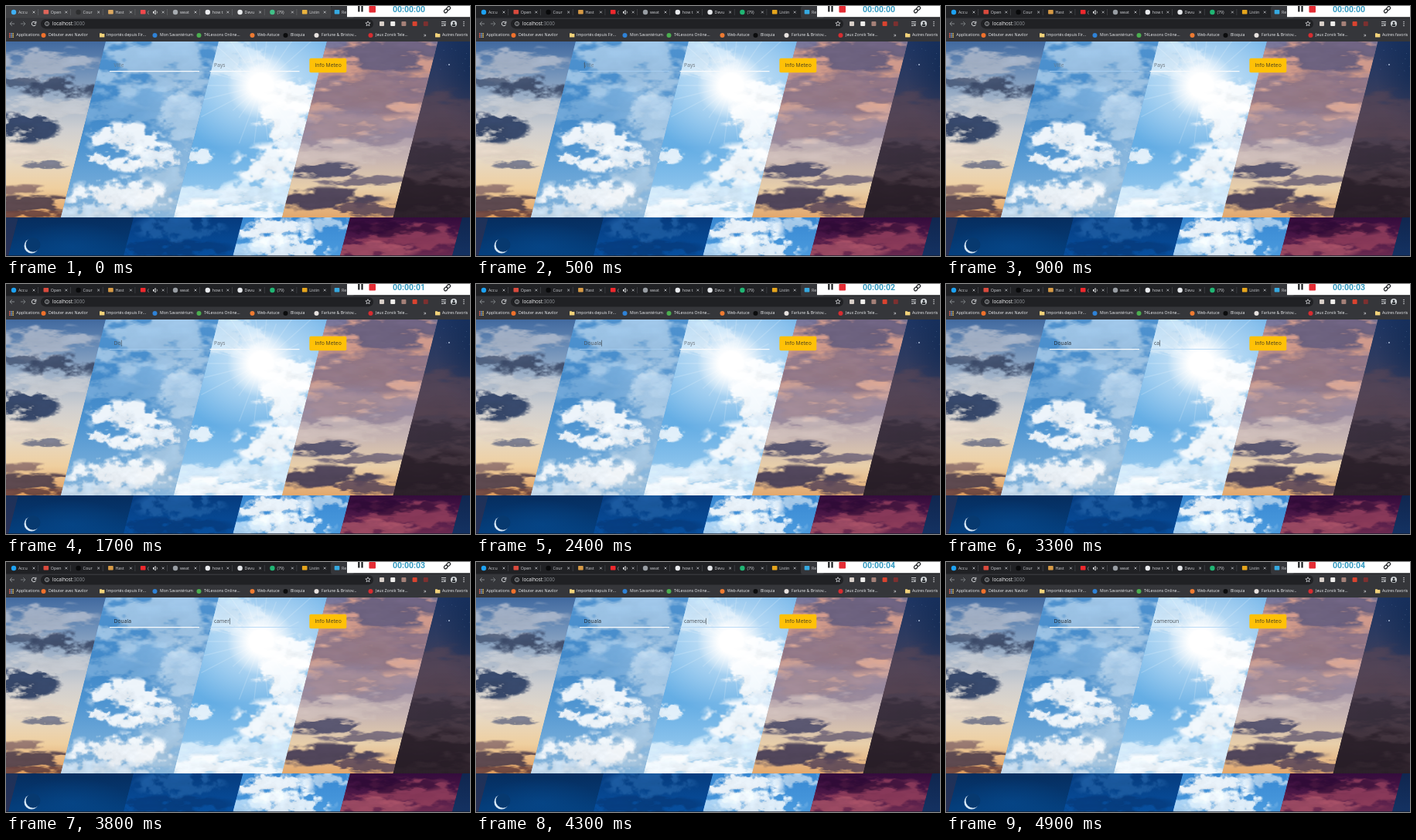
Recreate the animation shown at these times as an HTML page with a canvas. Size 600 by 324 pixels, loop 5000 ms.

```html
<!DOCTYPE html>
<html lang="fr">
<head>
<meta charset="utf-8">
<title>Info Meteo</title>
<style>
html, body { margin: 0; width: 100%; height: 100%; overflow: hidden; background: #202124; }
canvas { display: block; width: 600px; height: 324px; }
</style>
</head>
<body>
<canvas id="stage"></canvas>
<script>
const start = performance.now();
const W = 600, H = 324, LOOP = 5000;
const ratio = Math.max(1, window.devicePixelRatio || 1);
const UI = '"Open Sans", "Noto Sans", sans-serif';

function prepare(canvas) {
  canvas.width = W * ratio;
  canvas.height = H * ratio;
  const c = canvas.getContext('2d');
  c.scale(ratio, ratio);
  return c;
}
const screen = prepare(document.getElementById('stage'));
const backdrop = document.createElement('canvas');
let g = prepare(backdrop);

const clamp = (v, low = 0, high = 1) => Math.min(high, Math.max(low, v));

function rect(x, y, w, h, fill, r = 0) {
  g.fillStyle = fill;
  g.beginPath();
  g.roundRect(x, y, w, h, r);
  g.fill();
}
function disc(x, y, r, fill) {
  g.fillStyle = fill;
  g.beginPath();
  g.arc(x, y, r, 0, 7);
  g.fill();
}
function path(points, stroke, width = 1) {
  g.strokeStyle = stroke;
  g.lineWidth = width;
  g.beginPath();
  points.forEach(([x, y]) => g.lineTo(x, y));
  g.stroke();
}
function ring(x, y, r, stroke, width = 1, from = 0, to = 7) {
  g.strokeStyle = stroke;
  g.lineWidth = width;
  g.beginPath();
  g.arc(x, y, r, from, to);
  g.stroke();
}
function text(s, x, y, size, fill, font = UI, weight = 400) {
  g.font = `${weight} ${size}px ${font}`;
  g.textBaseline = 'middle';
  g.fillStyle = fill;
  g.fillText(s, x, y);
  return g.measureText(s).width;
}

// ---- sky -------------------------------------------------------------

function hash(i, j) {
  let n = Math.imul(i, 374761393) + Math.imul(j, 668265263);
  n = Math.imul(n ^ (n >>> 13), 1274126177);
  return ((n ^ (n >>> 16)) >>> 0) / 4294967296;
}
function noise(x, y) {
  const i = Math.floor(x), j = Math.floor(y);
  const u = (x - i) ** 2 * (3 - 2 * (x - i)), v = (y - j) ** 2 * (3 - 2 * (y - j));
  const top = hash(i, j) * (1 - u) + hash(i + 1, j) * u;
  const low = hash(i, j + 1) * (1 - u) + hash(i + 1, j + 1) * u;
  return top * (1 - v) + low * v;
}
const fractal = (x, y) =>
  (noise(x, y) * 8 + noise(x * 2, y * 2) * 4 + noise(x * 4, y * 4) * 2 + noise(x * 8, y * 8)) / 15;

// An ellipse of vapour whose edge and shading come from fractal noise.
function cloud(x, y, w, h, rgb, alpha = .9, stretch = 1.4) {
  const tw = Math.ceil(w * 1.3), th = Math.ceil(h * 1.4), scale = 5 + h * .12;
  const tile = new OffscreenCanvas(tw, th), c = tile.getContext('2d');
  const image = c.createImageData(tw, th);
  for (let k = 0; k < tw * th; k++) {
    const px = k % tw, py = Math.floor(k / tw);
    const body = 1 - Math.hypot(px / tw * 2 - 1, py / th * 2 - 1);
    if (body <= 0) continue;
    const f = fractal((x + px) / scale / stretch, (y + py) / scale);
    const density = clamp((body * 1.3 + (f - .5) * 2.6 - .12) / .5);
    const shade = .88 + .16 * f + .06 * (1 - py / th);
    rgb.forEach((v, n) => image.data[k * 4 + n] = clamp(v * shade, 0, 255));
    image.data[k * 4 + 3] = 255 * alpha * density * clamp(body * 4);
  }
  c.putImageData(image, 0, 0);
  g.drawImage(tile, x - tw / 2, y - th / 2);
}
function glow(x, y, rx, ry, rgb, alpha, core = 0) {
  g.save();
  g.translate(x, y);
  g.scale(rx, ry);
  const soft = g.createRadialGradient(0, 0, 0, 0, 0, 1);
  soft.addColorStop(core, `rgba(${rgb},${alpha})`);
  soft.addColorStop(1, `rgba(${rgb},0)`);
  g.fillStyle = soft;
  g.fillRect(-1, -1, 2, 2);
  g.restore();
}
function panel(top, bottom, x0, x1, slant, colors, details) {
  g.save();
  g.beginPath();
  [[x0, top], [x1, top], [x1 - slant, bottom], [x0 - slant, bottom]].forEach(p => g.lineTo(...p));
  g.clip();
  const sky = g.createLinearGradient(0, top, 0, bottom);
  colors.forEach((c, i) => sky.addColorStop(i / (colors.length - 1), c));
  g.fillStyle = sky;
  g.fillRect(0, top, W, bottom - top);
  details();
  g.restore();
}
const upper = (x0, x1, colors, details) => panel(46, 274, x0, x1, 58, colors, details);
const lower = (x0, x1, colors, details) => panel(274, 324, x0, x1, 13, colors, details);
const WHITE = [252, 253, 254], SLATE = [58, 72, 102], PLUM = [72, 62, 86];

function drawSky() {
  upper(-90, 129, ['#41699f', '#6d8fb8', '#a3b4c9', '#cfcfd0', '#e6d9c6', '#efcf9f', '#dd9a5c'], () => {
    cloud(45, 75, 130, 40, [192, 196, 207], .7, 2.5);
    cloud(60, 130, 130, 30, [212, 212, 214], .6, 2.5);
    cloud(70, 105, 95, 26, SLATE, .9, 2.2);
    cloud(15, 98, 60, 14, SLATE, .7, 2.2);
    cloud(22, 157, 84, 34, [46, 64, 100], .95, 1.9);
    cloud(40, 190, 110, 24, [226, 210, 196], .6, 3);
    cloud(52, 205, 60, 10, [98, 104, 130], .8, 2.6);
    cloud(20, 238, 80, 12, [128, 98, 100], .8, 3);
    cloud(32, 256, 130, 20, [84, 66, 76], .95, 3);
    cloud(40, 270, 110, 10, [104, 66, 62], .9, 3);
  });

  upper(129, 275, ['#4f92cf', '#4a8fcd', '#3f87c8', '#4f95d1', '#6ea8d8', '#86b4da'], () => {
    glow(232, 190, 60, 130, '188,212,232', .5);
    cloud(200, 80, 170, 80, [206, 225, 241], .6, 1.8);
    cloud(170, 130, 150, 50, [170, 205, 234], .45, 1.8);
    cloud(230, 140, 60, 70, [214, 230, 243], .55);
    cloud(154, 172, 88, 38, WHITE);
    cloud(198, 194, 72, 30, [240, 245, 250]);
    cloud(118, 197, 32, 14, WHITE);
    cloud(160, 205, 60, 16, WHITE);
    cloud(205, 240, 70, 70, [184, 207, 226], .6);
    cloud(147, 248, 126, 46, [248, 249, 250]);
    cloud(125, 270, 150, 22, [206, 222, 236], .85);
  });

  upper(275, 415, ['#74b5e9', '#82bfed', '#6fb4e8', '#64ade4', '#86c0eb', '#b4d8f1'], () => {
    cloud(285, 66, 100, 44, [214, 234, 248], .6);
    glow(330, 103, 115, 95, '255,255,255', .7);
    for (let i = 0; i < 26; i++) {
      const a = i * Math.PI / 13, r = 45 + 50 * hash(i, 3);
      path([[330, 103], [330 + r * Math.cos(a), 103 + r * Math.sin(a)]], 'rgba(255,255,255,.17)', 1.4);
    }
    glow(330, 103, 44, 44, '255,255,255', 1, .35);
    cloud(368, 118, 70, 40, WHITE);
    cloud(362, 150, 78, 50, WHITE);
    cloud(376, 180, 60, 40, [232, 241, 249]);
    cloud(342, 206, 90, 46, WHITE);
    cloud(246, 194, 40, 18, WHITE, .8);
    cloud(330, 243, 110, 34, [222, 237, 248], .8);
    cloud(255, 247, 130, 24, [226, 239, 249], .75, 2);
    cloud(275, 267, 190, 30, [245, 249, 252], .9, 1.8);
  });

  upper(415, 558.5, ['#77759a', '#9c8597', '#b39095', '#aa9aab', '#c6b4b2', '#e8cfaa', '#e2a76c'], () => {
    cloud(470, 85, 210, 100, [220, 158, 136], .8, 3);
    cloud(440, 130, 180, 80, [224, 172, 152], .7, 3);
    cloud(500, 62, 150, 38, [92, 88, 124], .85, 2.6);
    cloud(480, 112, 180, 50, [112, 98, 128], .65, 3);
    cloud(440, 160, 190, 44, [138, 124, 148], .65, 3);
    cloud(440, 190, 160, 30, [214, 198, 192], .6, 3);
    cloud(405, 212, 100, 18, [82, 80, 108], .95, 2.8);
    cloud(460, 226, 110, 14, [100, 90, 114], .8, 3);
    cloud(410, 250, 140, 26, PLUM, .95, 2.6);
    cloud(470, 262, 100, 18, [92, 72, 88], .9, 2.8);
  });

  upper(558.5, 700, ['#1d3563', '#2c3a60', '#44405a', '#4c3e4c', '#41333d', '#2b2029'], () => {
    glow(604, 80, 48, 90, '14,40,82', .75);
    cloud(560, 150, 120, 70, [94, 70, 80], .5, 3);
    cloud(565, 195, 140, 40, [50, 42, 56], .7, 3);
    cloud(545, 245, 140, 50, [38, 28, 38], .75, 3);
    disc(573, 76, .9, '#b8c8e2');
    for (let i = 0; i < 12; i++) disc(558 + hash(i, 1) * 42, 50 + hash(i, 2) * 45, .35, '#6d84ab');
  });

  lower(-30, 16, ['#1c3159', '#2a3156'], () => {});
  lower(16, 165, ['#062d5e', '#04407f'], () => {
    glow(85, 312, 75, 32, '6,74,142', .6);
    disc(33, 311, 9.5, '#d6e7f6');
    disc(35, 309.4, 9.4, '#07396f');
  });
  lower(165, 306.5, ['#063b7d', '#0750a0'], () => {
    cloud(225, 288, 100, 32, [40, 104, 172], .6);
    cloud(215, 314, 140, 20, [6, 52, 112], .6, 2);
  });
  lower(306.5, 445, ['#3888d2', '#4b9bde'], () => {
    cloud(345, 287, 92, 40, WHITE);
    cloud(410, 281, 70, 18, [214, 232, 247], .7);
    cloud(365, 313, 100, 30, [238, 246, 252], .9);
    cloud(308, 318, 44, 18, [205, 228, 246], .7);
  });
  lower(445, 590, ['#340c3c', '#4a1746', '#6b2a50'], () => {
    cloud(520, 300, 140, 34, [160, 70, 96], .7, 2.4);
    cloud(470, 315, 110, 20, [176, 88, 106], .7, 2.4);
    cloud(490, 288, 130, 18, [44, 10, 52], .75, 2.6);
  });
  lower(590, 640, ['#10264f', '#143262'], () => {});
  rect(0, 323, W, 1, 'rgba(22,28,42,.65)');
}

// ---- browser window --------------------------------------------------

const TABS = [
  ['Accu', '#1da1f2'], ['Open', '#d94a3d', 1], ['Cour', '#08090a'], ['Hast', '#d79a45', 1],
  ['(', '#f0282d', 1], ['weat', '#989da3'], ['how t', '#e8eaed'], ['Devu', '#e4e6e9'],
  ['(79)', '#20b573'], ['Listin', '#e6a51c', 1], ['Re', '#36a9e0', 1]
];
const BOOKMARKS = [
  [55, 'Débuter avec Navilor', '#f0712c'], [130, 'Importés depuis Fir...', 'folder'],
  [199, 'Mon Savantérium', '#2f82d7'], [256, 'T4Lessons Online...', '#4caf50'],
  [325, 'Web-Astuce', '#ee7b32'], [368, 'Bloquia', '#0b0c0d'],
  [408, 'Farlune & Bristov...', '#e7e2df'], [478, 'Jeux Zorvik Tele...', '#d72d31'],
  [564, 'Autres favoris', 'folder']
];
const PALE = '#eef0f2';

function drawTabs() {
  rect(0, 0, W, 16, '#202124');
  rect(420, 0, 30, 16, '#35363a', 3);
  TABS.forEach(([label, color, square], i) => {
    const x = 10 + i * 41.8;
    if (square) rect(x - 3.3, 5, 6.6, 5.6, color, .8);
    else disc(x, 8, 3.2, color);
    g.save();
    g.beginPath();
    g.rect(x + 5, 0, 18, 15);
    g.clip();
    text(label, x + 6, 8.2, 5.3, '#d0d2d6');
    g.restore();
    if (i === 10) return;
    const cx = x + 26;
    path([[cx - 1.4, 6.6], [cx + 1.4, 9.4]], '#d4d7db', .7);
    path([[cx + 1.4, 6.6], [cx - 1.4, 9.4]], '#d4d7db', .7);
    if (i < 9) rect(x + 31.3, 4, .5, 8, '#55585d');
  });
  rect(190, 7, 1.6, 2.4, PALE);
  path([[191.5, 7], [193.3, 5.6], [193.3, 10.8], [191.5, 9.4]], PALE, .8);
  ring(193.6, 8.2, 2, PALE, .6, -.8, .8);
}

function drawToolbar() {
  rect(0, 15.5, W, 30.5, '#35363a');
  rect(45, 17, 430, 12.4, '#202124', 6.2);
  path([[11, 23], [5, 23], [7.8, 20.2]], '#8f9296', .9);
  path([[5, 23], [7.8, 25.8]], '#8f9296', .9);
  path([[19, 23], [25, 23], [22.2, 20.2]], '#7d8084', .9);
  path([[25, 23], [22.2, 25.8]], '#7d8084', .9);
  ring(36, 23, 2.7, PALE, .9, .3, 5.5);
  path([[38.8, 19.8], [38.8, 22.4], [36.5, 22.4]], PALE, .9);
  ring(53, 23, 2.6, '#c4c7cb', .7);
  rect(52.7, 22.6, .7, 2, '#c4c7cb');
  rect(52.7, 21.4, .7, .7, '#c4c7cb');
  const w = text('localhost', 60, 23.2, 6.2, '#f4f5f6');
  text(':3000', 60 + w, 23.2, 6.2, '#92969b');

  const star = [];
  for (let i = 0; i <= 10; i++) {
    const a = i * Math.PI / 5 - Math.PI / 2, r = i % 2 ? 1.5 : 3.3;
    star.push([468 + r * Math.cos(a), 23 + r * Math.sin(a)]);
  }
  path(star, PALE, .7);
  ['#d8cfc8', '#efeeec', '#a58178', '#d9432f', '#7c3030'].forEach((color, i) =>
    rect(483 + i * 14.2, 20, 6, 6, color, 1));
  [20.5, 23, 25.5].forEach((y, i) => {
    rect(563, y - .4, i === 2 ? 3 : 6, .8, PALE);
    disc(592, y, .7, PALE);
  });
  disc(567.5, 25, 1, PALE);
  disc(579, 23, 4, '#d5d9dc');
  disc(579, 21.8, 1.4, '#25282b');
  rect(576.8, 23.6, 4.4, 2.7, '#25282b', 1);
}

function drawBookmarks() {
  for (let i = 0; i < 9; i++) {
    rect(4 + (i % 3) * 2.2, 35 + (i / 3 | 0) * 2.2, 1.5, 1.5, ['#e8665a', '#6ea5ec', '#e8c259'][i % 3]);
  }
  text('Applications', 13.3, 38, 5.3, PALE);
  BOOKMARKS.forEach(([x, label, color]) => {
    if (color === 'folder') {
      rect(x - 9, 35.2, 3, 2, '#f2d27a', .4);
      rect(x - 9, 36, 6.4, 4.6, '#f2d27a', .5);
    } else disc(x - 6.5, 38, 3, color);
    text(label, x, 38, 5.2, PALE);
  });
  text('»', 540, 37.8, 7, PALE);
}

function drawRecorder() {
  rect(441, 0, 159, 14.3, '#fff');
  rect(455.2, 0, 2.2, 7.5, '#17191b');
  rect(459.4, 0, 2.2, 7.5, '#17191b');
  rect(469.4, 0, 8.6, 8.6, '#e52c34', 1);
  g.save();
  g.translate(570.5, 4.7);
  g.rotate(-Math.PI / 4);
  g.strokeStyle = '#202326';
  g.lineWidth = 1.2;
  [-5, -.2].forEach(x => {
    g.beginPath();
    g.roundRect(x, -1.9, 5.2, 3.8, 1.9);
    g.stroke();
  });
  g.restore();
}

function drawButton() {
  rect(392.4, 67.8, 47.9, 18.5, '#ffc107', 1.8);
  g.textAlign = 'center';
  text('Info Meteo', 416.6, 77, 6.75, '#453d22');
  g.textAlign = 'left';
}

// ---- page form -------------------------------------------------------

const FIELDS = [
  { x: 134, hint: 'Ville', value: 'Douala', focus: 400, blur: 2800,
    keys: [1500, 1600, 1800, 2000, 2100, 2300] },
  { x: 263.5, hint: 'Pays', value: 'cameroun', focus: 2800, blur: LOOP,
    keys: [3100, 3200, 3400, 3600, 3700, 4000, 4200, 4400] }
];

function drawField({ x, hint, value, focus, blur, keys }, t) {
  const focused = t >= focus && t < blur;
  const typed = keys.filter(k => k <= t);
  const shown = value.slice(0, typed.length);
  const left = x + 5.6;
  rect(x, 83.9, 116, focused ? .9 : 1.3, focused ? '#a9d1f4' : '#f8fafc');
  let end = left;
  if (shown) end += text(shown, left, 77, 6.75, focused ? '#495057' : '#20262d');
  else text(hint, left, 77, 6.75, x < 200 ? 'rgba(108,117,125,.8)' : '#6c757d');
  const since = t - (typed.at(-1) ?? focus);
  if (focused && since % 1000 < 500) rect(end + .3, 72.7, .6, 8, '#394149');
}

function drawFrame(t) {
  screen.drawImage(backdrop, 0, 0, W, H);
  // The tab strip stays pale until the first click activates the window.
  if (t < FIELDS[0].focus) rect(0, 0, 420, 15.5, 'rgba(255,255,255,.15)');
  const seconds = Math.max(0, Math.floor((t - 100) / 1000));
  g.textAlign = 'center';
  text('00:00:0' + seconds, 521, 5.2, 10.5, '#359bc1', 'Roboto, sans-serif', 700);
  g.textAlign = 'left';
  FIELDS.forEach(f => drawField(f, t));
}

drawSky();
drawTabs();
drawToolbar();
drawBookmarks();
drawRecorder();
drawButton();
g = screen;

function tick() {
  const t = (performance.now() - start) % LOOP;
  drawFrame(Math.floor(t / 100) * 100);
  requestAnimationFrame(tick);
}
tick();
</script>
</body>
</html>
```
